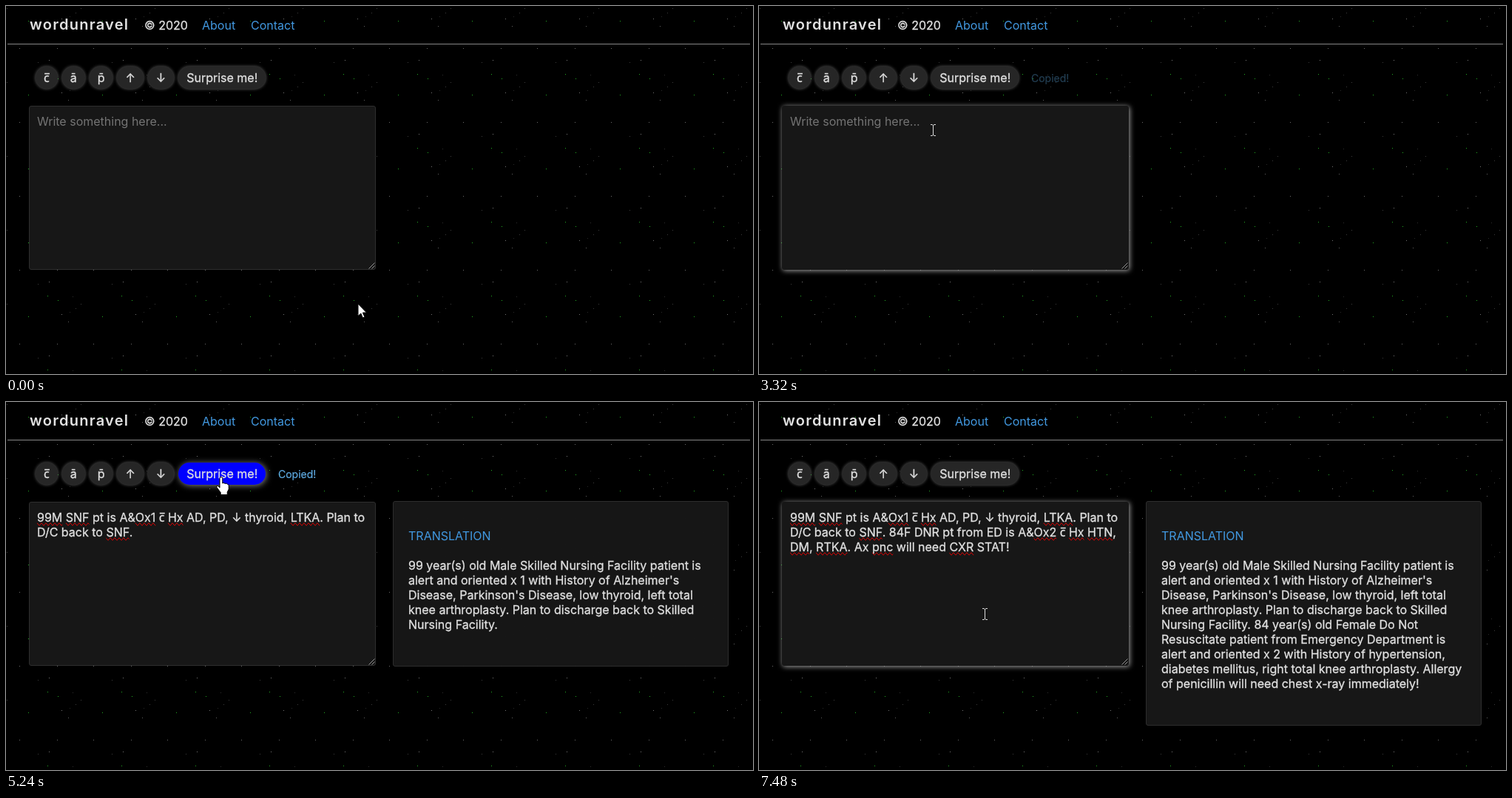
Write an HTML page that moves like this. It is 1010 by 498 pixels and loops after 8000 ms.

```html
<!DOCTYPE html>
<html lang="en">
<head>
<meta charset="utf-8">
<title>wordunravel</title>
<style>
html, body { margin: 0; width: 100%; height: 100%; overflow: hidden; background: #000; }
body { position: relative; font: 16px/20px Inter, "Noto Sans", sans-serif; color: #e2e2e2; }
body > * { position: absolute; box-sizing: border-box; white-space: pre; }
svg { left: 0; top: 0; overflow: visible; }
.bold, .btn, #area, #result { -webkit-text-stroke: .3px; }
.logo { left: 32px; top: 15px; font-size: 20px; font-weight: 600; letter-spacing: 1.25px; }
.head { top: 16px; }
.link { color: #4299e1; }
.rule { left: 2px; top: 51px; width: 1004px; height: 1px; background: #868686; }
#bar { left: 40px; top: 82px; display: flex; gap: 6px; }
.btn { height: 30px; line-height: 30px; padding: 0 11px; border-radius: 15px;
  background: #262626; box-shadow: 0 0 4px #666; }
.btn.hover { background: #00f; box-shadow: 1px 1px 8px #888; }
.box { background: #171717; border: 1px solid #2e2e2e; border-radius: 3px; }
#area { left: 31px; top: 135px; width: 469px; height: 222px; padding: 10px; }
#area.hover { border-color: #171717; box-shadow: 1px 1px 7px #aaa; }
#area.empty { color: #747474; -webkit-text-stroke: 0; }
#area u { text-decoration: underline wavy red 1px; text-decoration: spelling-error; }
#caret { width: 1px; height: 19px; background: #e2e2e2; }
#copied { left: 368px; top: 88px; font-size: 14px; color: #63b3ed; -webkit-text-stroke: .2px; }
#panel { left: 523px; top: 134px; width: 454px; padding: 36px 20px; }
#panel .link { margin-bottom: 20px; }
</style>
</head>
<body>
<svg width="1010" height="498">
  <defs><pattern id="stars" width="100" height="100" patternUnits="userSpaceOnUse"></pattern></defs>
  <rect width="1010" height="498" fill="url(#stars)"/>
</svg>
<div class="logo">wordunravel</div>
<div class="head bold" style="left:187px">© 2020</div>
<div class="head link" style="left:265px">About</div>
<div class="head link" style="left:331px">Contact</div>
<div class="rule"></div>
<div id="bar"></div>
<div id="area" class="box"></div>
<div id="caret"></div>
<div id="copied">Copied!</div>
<div id="panel" class="box"><div class="link">TRANSLATION</div><div id="result"></div></div>
<svg width="1010" height="498">
  <path d="M490.5 355.5l8-8M494.5 355.5l4-4" stroke="#999"/>
  <g id="cursor" stroke="#000" stroke-linejoin="round">
    <path id="arrow" fill="#fff" d="M0 0V16.5L3.8 13l2.6 6 2.6-1.1L6.4 12H11.5z"/>
    <path id="hand" fill="#fff" d="M-2 1.5a1.9 1.9 0 0 1 3.8 0V8l1.4-.6 2 1 2-.3 1.5 1.5 1.5.4V16l-2 4v3.5h-9V20.5L-6 13.5q-.8-2.5 1.5-2L-2 14z"/>
    <path id="beam" fill="none" stroke="#ddd" d="M-3 -7.5H-1L.5 -6.5 2 -7.5H4M.5 -6.5V6.5M-3 7.5H-1L.5 6.5 2 7.5H4"/>
  </g>
</svg>
<script>
const $ = id => document.getElementById(id);
const LOOP = 8000;

// star tile: a few green dots, the rest scattered greys
let seed = 7;
const random = n => (seed = seed * 16807 % 2147483647) % n;
const dot = (x, y, fill) => `<rect x="${x}" y="${y}" width="1" height="1" fill="${fill}"/>`;
let tile = dot(30, 20, '#2a2') + dot(56, 92, '#2a2') + dot(70, 98, '#2a2');
for (let i = 0; i < 10; i++) {
  const grey = 40 + random(90);
  tile += dot(random(100), random(100), `rgb(${grey},${grey},${grey})`);
}
$('stars').innerHTML = tile;

$('bar').innerHTML = ['c\u0305', 'ā', 'p\u0304', '↑', '↓', 'Surprise me!']
  .map(label => `<div class="btn">${label}</div>`).join('');
const buttons = [...$('bar').children];

// *word* marks a misspelling
const mark = s => s.replace(/&/g, '&amp;').replace(/\*(.+?)\*/g, '<u>$1</u>');
const note1 = '*99M* *SNF* pt is A&*Ox1* c\u0305 *Hx* AD, PD, ↓ thyroid, *LTKA*. Plan to\nD/C back to *SNF*. ';
const note2 = note1 + '84F DNR pt from ED is A&*Ox2* c\u0305 *Hx* *HTN*,\n*DM*, *RTKA*. Ax *pnc* will need *CXR* STAT!';
const notes = ['Write something here...', mark(note1), mark(note2)];
const result1 = `99 year(s) old Male Skilled Nursing Facility patient is
alert and oriented x 1 with History of Alzheimer's
Disease, Parkinson's Disease, low thyroid, left total
knee arthroplasty. Plan to discharge back to Skilled
Nursing Facility.`;
const result2 = result1 + ` 84 year(s) old Female Do Not
Resuscitate patient from Emergency Department is
alert and oriented x 2 with History of hypertension,
diabetes mellitus, right total knee arthroplasty. Allergy
of penicillin will need chest x-ray immediately!`;

// pointer moves: start, end, x, y
const moves = [
  [80, 700, 60, 103], [850, 1540, 252, 92], [1690, 1770, 257, 100], [2090, 2560, 235, 168],
  [3860, 4320, 250, 205], [4470, 4700, 291, 102], [5320, 5860, 275, 215], [6700, 6940, 305, 287]
];
const paste1 = 3500, paste2 = 6480;
const blinks = [2480, paste1, 5700, paste2];

const clamp = v => Math.min(1, Math.max(0, v));
const easeOut = p => 1 - (1 - clamp(p)) ** 2;
const swing = p => 0.5 - Math.cos(Math.PI * clamp(p)) / 2;
const show = (el, on) => { el.style.visibility = on ? 'visible' : 'hidden'; };

function pointer(t) {
  let x = 476, y = 403;
  for (const [start, end, toX, toY] of moves) {
    const p = easeOut((t - start) / (end - start));
    x += (toX - x) * p;
    y += (toY - y) * p;
  }
  return [Math.round(x), Math.round(y)];
}

function hits(el, x, y) {
  const r = el.getBoundingClientRect();
  return x >= r.left && x < r.right && y >= r.top && y < r.bottom;
}

function hover(el, x, y) {
  const on = hits(el, x, y);
  el.classList.toggle('hover', on);
  return on;
}

const last = {};
function setHTML(id, html) {
  if (last[id] !== html) $(id).innerHTML = last[id] = html;
}

function draw(t) {
  const [x, y] = pointer(t);
  const inArea = hover($('area'), x, y);
  const onButton = buttons.filter(b => hover(b, x, y)).length > 0;
  $('cursor').setAttribute('transform', `translate(${x} ${y})`);
  show($('beam'), inArea);
  show($('hand'), onButton);
  show($('arrow'), !inArea && !onButton);

  const pasted = (t >= paste1) + (t >= paste2);
  $('area').classList.toggle('empty', !pasted);
  setHTML('area', notes[pasted]);

  show($('caret'), blinks.some(b => t >= b && t < b + 530));
  $('caret').style.left = [42, 176, 340][pasted] + 'px';
  $('caret').style.top = 147 + 20 * pasted + 'px';

  const click = t < 5160 ? 2010 : 5160;
  $('copied').style.opacity = t < click ? 0 : 1 - clamp((t - click) / 2000);

  const grown = t >= 7400;
  $('panel').style.opacity = swing((t - 4670) / 600);
  $('panel').style.height = (grown ? 304 : 224) + 'px';
  setHTML('result', grown ? result2 : result1);
}

const start = performance.now();
function tick() {
  draw((performance.now() - start) % LOOP);
  requestAnimationFrame(tick);
}
tick();
</script>
</body>
</html>
```
